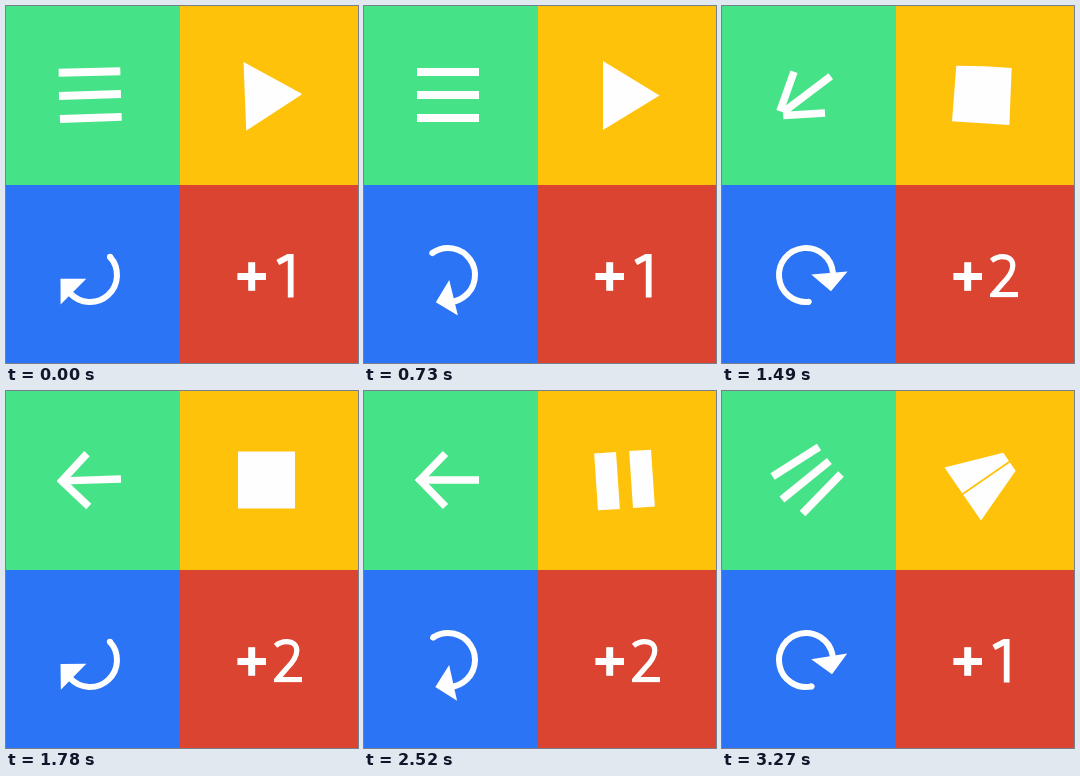
Recreate the animation shown at these times as an HTML page with a canvas. Size 352x357 px, loop 3310 ms.

```html
<!DOCTYPE html>
<html lang="en">
<head>
<meta charset="utf-8">
<title>Icon transitions</title>
<style>
html, body { margin: 0; width: 100%; height: 100%; overflow: hidden; }
canvas { display: block; width: 352px; height: 357px; }
</style>
</head>
<body>
<canvas id="stage" width="352" height="357"></canvas>
<script>
const ctx = document.getElementById('stage').getContext('2d');
const LOOP = 3310;
const WHITE = '#fefefe';
const RAD = Math.PI / 180;

const lerp = (a, b, k) => a + (b - a) * k;
const mix = (a, b, k) => [lerp(a[0], b[0], k), lerp(a[1], b[1], k)];

// cubic-bezier(.4, 0, .2, 1)
function ease(x) {
  if (x <= 0) return 0;
  if (x >= 1) return 1;
  let lo = 0, hi = 1, u = 0.5;
  for (let i = 0; i < 24; i++) {
    u = (lo + hi) / 2;
    const v = 1 - u;
    if (1.2 * v * v * u + 0.6 * v * u * u + u * u * u < x) lo = u; else hi = u;
  }
  return 3 * (1 - u) * u * u + u * u * u;
}
const step = (t, start, span) => ease((t - start) / span);
const sine = x => (1 - Math.cos(Math.PI * x)) / 2;
const cubic = x => x < 0.5 ? 4 * x ** 3 : 1 - 4 * (1 - x) ** 3;

function at(x, y, deg, draw) {
  ctx.save();
  ctx.translate(x, y);
  ctx.rotate(deg * RAD);
  draw();
  ctx.restore();
}

function line(a, b) {
  ctx.beginPath();
  ctx.moveTo(...a);
  ctx.lineTo(...b);
  ctx.stroke();
}

function addPoly(pts) {
  pts.forEach((p, i) => i ? ctx.lineTo(...p) : ctx.moveTo(...p));
  ctx.closePath();
}

function tiles() {
  const box = (c, x, y, w, h) => { ctx.fillStyle = c; ctx.fillRect(x, y, w, h); };
  box('#46e287', 0, 0, 174, 179);
  box('#ffc20a', 174, 0, 178, 179);
  box('#2b74f6', 0, 179, 174, 178);
  box('#db4431', 174, 179, 178, 178);
}

// Menu bars <-> back arrow, half a turn each way
function menu(t) {
  const toMenu = step(t, -725, 830);
  const toArrow = step(t, 1063, 830);
  const back = step(t, 2851, 830);
  const k = 1 - toMenu + toArrow - back;
  ctx.lineWidth = lerp(8, 7.4, k);
  at(84, 89, 180 * (toMenu + toArrow + back - 1), () => {
    line([-31, 0], [lerp(31, 27, k), 0]);
    for (const s of [-1, 1]) {
      line(mix([-31, 23 * s], [2.5, 26.5 * s], k), mix([31, 23 * s], [30.5, -2.5 * s], k));
    }
  });
}

// Play -> stop -> pause -> play
const H = 28.5, TIP = [0.5, -35], BASE = 21.5, HALF = 34.5;

function halves(gap, k) {
  for (const s of [-1, 1]) {
    addPoly([
      mix([H * s, H], [HALF * s + 0.5, BASE], k),
      mix([H * s, -H], TIP, k),
      mix([gap * s / 2, -H], TIP, k).map((v, i) => i ? v : gap * s / 2 + 0.5 * k),
      [gap * s / 2 + 0.5 * k, lerp(H, BASE, k)]
    ]);
  }
}

function player(t) {
  const span = 765;
  const GAP = 14.5;
  let deg, shape;
  if (t >= 917 && t < 1952) {
    const k = step(t, 917, span);
    deg = 90 * (1 - k);
    shape = () => addPoly([
      mix([-HALF + 0.5, BASE], [-H, H], k),
      mix([-17, -7], [-H, -H], k),
      mix(TIP, [0, -H], k),
      mix(TIP, [H, -H], k),
      mix([HALF + 0.5, BASE], [H, H], k)
    ]);
  } else if (t >= 1952 && t < 2964) {
    const k = step(t, 1952, span);
    deg = 90 * (k - 1);
    shape = () => halves(GAP * k ** 2.2, 0);
  } else {
    const k = step(t, t < 917 ? -612 : 2964, span);
    deg = 90 * k;
    shape = () => halves(GAP * (1 - k) ** 2.2, k);
  }
  at(260.5, 89, deg, () => {
    ctx.beginPath();
    shape();
    ctx.fill();
  });
}

// Refresh: the head turns by half turns while the arc shrinks and grows
function refresh(t) {
  const u = (t - 10) / 447;
  const n = Math.floor(u);
  const x = u - n;
  const odd = n & 1;
  const turn = (odd ? 0 : 180) + 180 * sine(x);
  const sweep = odd ? lerp(321, 214, cubic(x)) : lerp(214, 321, cubic(x));
  at(84, 269, turn, () => {
    const tail = (-8 - sweep) * RAD;
    ctx.lineWidth = 6;
    ctx.beginPath();
    ctx.arc(0, 0, 27, tail, -32 * RAD);
    ctx.stroke();
    ctx.beginPath();
    ctx.arc(27 * Math.cos(tail), 27 * Math.sin(tail), 3, 0, 7);
    ctx.fill();
    ctx.beginPath();
    addPoly([[29.5, -29.5], [29.5, -3.7], [3.7, -3.7]]);
    ctx.fill();
  });
}

// Each digit is one stroke: start, three curves, corner, foot
const TWO = [
  [269.5, 254.8], [273, 251.8], [277, 250.6], [280.5, 250.6],
  [287, 250.6], [290.8, 254], [290.8, 259.5],
  [290.8, 266], [287, 271], [281, 277],
  [270.8, 288.7], [296, 288.7]
];
const ONE = [
  [271.8, 256.5], [275, 254.8], [279, 252.6], [284.7, 249.6],
  [284.7, 253], [284.7, 256], [284.7, 260],
  [284.7, 265], [284.7, 270], [284.7, 278],
  [284.7, 288.7], [284.7, 292]
];

function counter(t) {
  const up = step(t, 750, 450);
  const down = step(t, 2560, 450);
  const one = 1 - up + down;

  at(245.7, 270.5, -90 * (up + down), () => {
    ctx.fillRect(-14.3, -3.5, 28.6, 7);
    ctx.fillRect(-3.5, -14.3, 7, 28.6);
  });

  const p = TWO.map((a, i) => mix(a, ONE[i], i === 11 ? one ** 10 : i === 10 ? one ** 4 : one));
  ctx.save();
  ctx.beginPath();
  ctx.rect(268, 248, 32, 43.5);
  ctx.clip();
  ctx.lineWidth = lerp(5.2, 5.8, one);
  ctx.beginPath();
  ctx.moveTo(...p[0]);
  for (let i = 1; i < 10; i += 3) ctx.bezierCurveTo(...p[i], ...p[i + 1], ...p[i + 2]);
  ctx.lineTo(...p[10]);
  ctx.lineTo(...p[11]);
  ctx.stroke();
  ctx.restore();
}

function draw(t) {
  tiles();
  ctx.fillStyle = ctx.strokeStyle = WHITE;
  menu(t);
  player(t);
  refresh(t);
  counter(t);
}

const begin = performance.now();
function tick() {
  draw((performance.now() - begin) % LOOP);
  requestAnimationFrame(tick);
}
tick();
</script>
</body>
</html>
```
